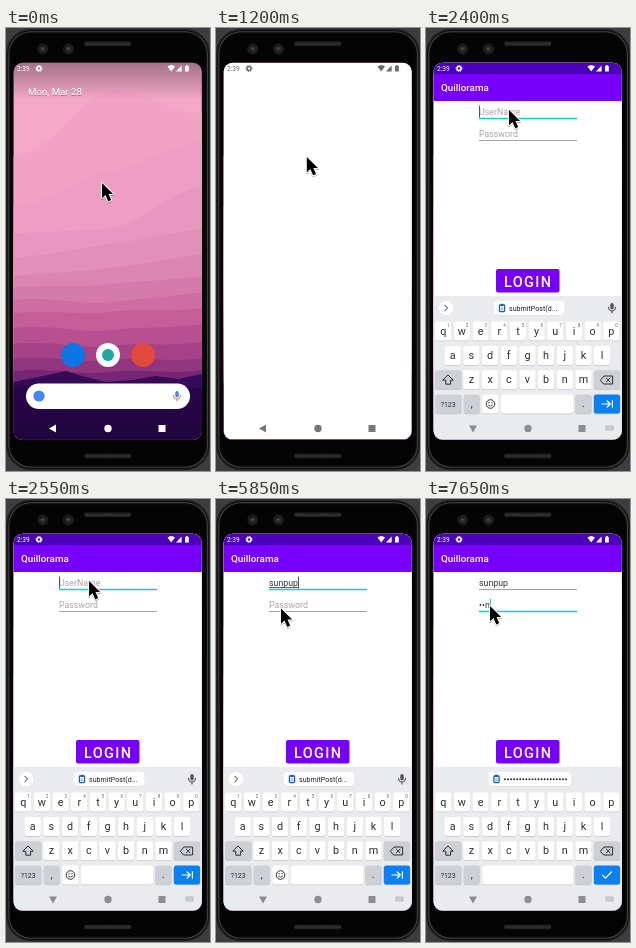
Recreate the animation shown at these times as an HTML page. Size 204 by 443 pixels, loop 8000 ms.

```html
<!DOCTYPE html>
<html lang="en">
<head>
<meta charset="utf-8">
<title>Login on a phone</title>
<style>
  html, body { margin: 0; width: 100%; height: 100%; overflow: hidden; background: #3d3d3f; }
  svg { display: block; font-family: Roboto, "Open Sans", sans-serif; }
  .mid { text-anchor: middle; }
  .medium { font-weight: 500; }
</style>
</head>
<body>
<svg id="stage" width="204" height="443" viewBox="0 0 204 443"></svg>
<script>
const LOOP = 8000, STEP = 150;
const USER = 'sunpup', APP = 'Quillorama';
const PURPLE = '#7800fa', TEAL = '#08d5c8';

const rect = (x, y, w, h, fill, rx = 0, more = '') =>
  `<rect x="${x}" y="${y}" width="${w}" height="${h}" rx="${rx}" fill="${fill}" ${more}/>`;
const circle = (x, y, r, fill, more = '') => `<circle cx="${x}" cy="${y}" r="${r}" fill="${fill}" ${more}/>`;
const path = (d, fill, more = '') => `<path d="${d}" fill="${fill}" ${more}/>`;
const line = (d, stroke, width = 1) =>
  path(d, 'none', `stroke="${stroke}" stroke-width="${width}" stroke-linecap="round" stroke-linejoin="round"`);
const text = (x, y, size, str, fill, more = '') =>
  `<text x="${x}" y="${y}" font-size="${size}" fill="${fill}" ${more}>${str}</text>`;
const group = (id, body, more = '') => `<g id="${id}" ${more}>${body}</g>`;

function phone() {
  const lens = x => circle(x, 21, 5, '#1b1b1d', 'stroke="#252527" stroke-width=".8"') +
    circle(x, 21, 2.6, '#303038') + circle(x - .5, 20.5, 1, '#4c4c58');
  const speaker = (y, h) => rect(78, y, 47.5, h, '#222224', 2) +
    path(`M80 ${y + h / 2}H124`, 'none', 'stroke="#363638" stroke-width="1.6" stroke-dasharray="2 1"');
  return rect(0, 0, 204, 443, '#3d3d3f') +
    rect(.8, 1.5, 202.4, 440, '#0a0a0a', 24, 'stroke="#232324" stroke-width="1.4"') +
    rect(2.8, 3.8, 198.6, 435.4, '#080808', 22, 'stroke="#434345" stroke-width="1.1"') +
    rect(5, 6, 194, 431, '#040404', 20) +
    lens(36.8) + lens(62.5) + speaker(13.5, 4.5) + speaker(425.7, 4.5);
}

function wallpaper() {
  // left, middle and right height of each haze layer
  const layers = [
    [128, 62, 84, '#f2a3c5'], [178, 142, 112, '#ee9ec2'], [206, 200, 158, '#e898c0'],
    [230, 216, 200, '#e28fba'], [248, 240, 226, '#dc85b3'], [260, 256, 248, '#d67aac'],
    [272, 274, 264, '#ce6ca3'], [285, 284, 280, '#c55d99'], [300, 302, 296, '#b84f90'],
    [316, 318, 314, '#a64187'], [331, 332, 330, '#91357f'], [343, 344, 342, '#772673']
  ];
  return rect(7, 34, 189, 378, '#f4a8c6') +
    layers.map(([l, m, r, c]) =>
      path(`M7 ${l}C50 ${l - 4} 75 ${m + 4} 105 ${m}S165 ${r + 5} 196 ${r}V412H7Z`, c)).join('') +
    path('M7 354L32 349L46 346L60 343L76 348L100 354L126 352L150 348L172 351L196 346V412H7Z', '#360b5a') +
    path('M7 357C55 353 70 368 110 366S165 357 196 360V412H7Z', '#2a064c') +
    rect(7, 34, 189, 378, 'url(#dusk)') + rect(7, 34, 189, 38, 'url(#shade)');
}

function mic(x, y, fill, base) {
  return rect(x - 1.7, y - 5, 3.4, 6.4, fill, 1.7) +
    line(`M${x - 3.4} ${y - .6}a3.4 3.6 0 0 0 6.8 0M${x} ${y + 3}v2`, base, 1.2);
}

function homeItems() {
  return text(22, 67, 9.7, 'Mon, Mar 28', '#fff', 'filter="url(#soft)"') +
    circle(67, 327, 12, '#0d75e4') +
    circle(102, 327, 12, '#fff') + circle(102, 327, 6, '#1ca9a0') +
    circle(137, 327, 12, '#df4a3c') +
    rect(20, 355.5, 164, 25.5, '#fff', 12.7) + circle(33, 368, 5.6, '#4285f4') +
    mic(171, 368, '#4285f4', '#ef7b45');
}

function statusBar() {
  return text(11, 43, 6.6, '2:39', 'currentColor') +
    circle(33, 40.5, 2, 'none', 'stroke="currentColor" stroke-width="1.5"') +
    circle(33, 40.5, 3, 'none', 'stroke="currentColor" stroke-width="1" stroke-dasharray="1.2 1.156"') +
    path('M161.5 38.6Q165.2 35.6 169 38.6L165.2 43.4Z', 'currentColor') +
    path('M170 43.4h5.6v-6Z', 'currentColor') +
    path('M179 38h1v-1h1.8v1h1v5.4H179Z', 'currentColor');
}

function navBar() {
  return group('back', path('M43 400.5L50 396.5V404.5Z', 'currentColor')) +
    circle(102, 400.5, 3.7, 'currentColor') + rect(152.5, 397, 7, 7, 'currentColor');
}

function button(x, y, w, h, label) {
  return rect(x, y, w, h, PURPLE, 2) +
    text(x + 8.1, y + 18, 14.5, label, '#fff', 'class="medium" letter-spacing="1.3"');
}

function field(id, hint, y) {
  return group(id, text(53, y, 8.8, hint, '#a6a6a6', 'class="hint"') +
    text(53, y, 8.8, '', '#333', 'class="value"') +
    path('', 'none', 'class="compose" stroke="#333" stroke-width=".8"') +
    path(`M53 ${y + 3.5}H151`, 'none', 'class="rule"') +
    rect(53, y - 9.5, 1, 12, id === 'user' ? '#555' : TEAL, 0, 'class="caret"'));
}

function app() {
  return rect(7, 34, 189, 378, '#fff') + rect(7, 46, 189, 27, PURPLE) + rect(7, 34, 189, 12, '#4b00b9') +
    text(15, 63.2, 9.8, APP, '#fff', 'class="medium"') +
    field('user', 'UserName', 87) + field('pass', 'Password', 109) +
    button(70, 241, 63.5, 23.5, 'LOGIN') + button(62, 316.5, 80, 23, 'SIGN UP') +
    group('darkNav', rect(7, 389, 189, 23, '#000'));
}

function keyboard() {
  const GREY = '#cdd1d6', INK = '#2c2e31';
  const key = (x, y, w, fill = '#fff') => rect(x, y + .8, w, 19, '#c3c6ca', 2.5) + rect(x, y, w, 19, fill, 2.5);
  const row = (letters, x0, y) => [...letters].map((c, i) => {
    const x = x0 + i * 18.68;
    return key(x - 8.2, y, 16.4) + text(x, y + 13, 10.8, c, INK, 'class="mid"');
  }).join('');
  const digits = [...'1234567890'].map((d, i) =>
    text(22.4 + i * 18.68, 298.6, 4.6, d, '#666', 'class="mid"')).join('');
  const clip = (x, y) => rect(x - 2.6, y - 3, 5.2, 6.6, 'none', .8, 'stroke="#1762b5" stroke-width="1.3"') +
    rect(x - 1.4, y - 4.2, 2.8, 2.2, '#1762b5') + line(`M${x - 1} ${y}h2M${x - 1} ${y + 1.8}h2`, '#1762b5', .6);
  const chip = (x, w, icon) => rect(x, 273.6, w, 14, '#d4d7db', 4) + rect(x, 273, w, 14, '#fff', 4) + clip(icon, 280);
  const face = circle(64.5, 376, 4.3, 'none', `stroke="${INK}" stroke-width="1"`) +
    circle(63, 374.8, .7, INK) + circle(66, 374.8, .7, INK) + line('M62.4 377.2q2.1 2 4.2 0', INK, .8);

  return rect(7, 268, 189, 144, '#e9ebef') +
    row('qwertyuiop', 17.2, 293.5) + row('asdfghjkl', 26.7, 318) + row('zxcvbnm', 45.4, 342.3) +
    key(9, 342.3, 26.5, GREY) + line('M22.2 347.2l5 5h-2.6v4h-4.8v-4h-2.6Z', INK) +
    key(167.8, 342.3, 26.3, GREY) + line('M174.6 352l3.4-4h8.6v8H178ZM180.4 350.2l3.6 3.6M184 350.2l-3.6 3.6', INK) +
    key(9, 366.5, 26.5, GREY) + text(22.2, 378.8, 7, '?123', INK, 'class="mid"') +
    key(37.7, 366.5, 16, GREY) + text(45.7, 379, 10, ',', INK, 'class="mid"') +
    key(149.2, 366.5, 16.4, GREY) + text(157.4, 379, 10, '.', INK, 'class="mid"') +
    key(167.8, 366.5, 26.3, '#0b80f0') +
    group('plainKeys', digits + key(56.2, 366.5, 16.4) + face + key(75, 366.5, 72) +
      circle(20, 280, 7, '#fff') + line('M18.8 277.2l2.8 2.8l-2.8 2.8', INK) +
      chip(68, 70.5, 76) + text(83, 282.6, 7.1, 'submitPost(d...', '#222') +
      mic(186, 280, '#555', '#555') +
      line('M176 376h8M181.2 373l3 3l-3 3M186.4 372.8v6.4', '#fff', 1.2)) +
    group('secretKeys', key(56.2, 366.5, 91) + line('M176.4 376.2l3 3l6-6.2', '#fff', 1.2)) +
    group('secretChip', chip(62.5, 82.5, 70.5) +
      Array.from({ length: 21 }, (_, i) => circle(79 + i * 3.05, 280.3, .95, '#222')).join('')) +
    rect(179.5, 397.5, 8, 5, '#b9bcc2', .8) + line('M181 399.2h5M181 401h5', '#e9ebef', .6);
}

const pointer = group('pointer', path('M0 0V15.2L3.5 12.1L6.3 18.4L9.2 17.1L6.5 11H11.1Z', '#000',
  'stroke="#fff" stroke-width="1.8" stroke-linejoin="round" paint-order="stroke" filter="url(#soft)"'));

document.getElementById('stage').innerHTML = `<defs>
  <clipPath id="screen">${rect(7.6, 34.8, 188.2, 376.8, '#000', 9)}</clipPath>
  <linearGradient id="dusk" x2="0" y2="1"><stop offset=".84" stop-color="#1d0338" stop-opacity="0"/>
    <stop offset="1" stop-color="#1d0338" stop-opacity=".75"/></linearGradient>
  <linearGradient id="shade" x2="0" y2="1"><stop offset="0" stop-color="#403038" stop-opacity=".46"/>
    <stop offset="1" stop-color="#403038" stop-opacity="0"/></linearGradient>
  <filter id="soft" x="-30%" y="-30%" width="160%" height="160%">
    <feDropShadow dx="0" dy=".7" stdDeviation=".7" flood-opacity=".5"/></filter>
</defs>` + phone() + group('view',
  wallpaper() + group('home', homeItems()) + group('splash', rect(7.6, 34.8, 188.2, 376.8, '#fff')) +
  group('app', app()) + group('keyboard', keyboard()) +
  group('status', statusBar()) + group('nav', navBar()), 'clip-path="url(#screen)"') + pointer;

const $ = id => document.getElementById(id);
const show = (el, on) => { el.style.display = on ? '' : 'none'; };
const within = (t, ...spans) => spans.some(([a, b]) => t >= a && t < b);
const countPast = (t, times) => times.filter(x => t >= x).length;

// Eased travel through [time, x, y] stops.
function along(stops, t) {
  const i = stops.findIndex(s => s[0] > t);
  if (i < 0) return stops[stops.length - 1].slice(1);
  if (i === 0) return stops[0].slice(1);
  const [t0, x0, y0] = stops[i - 1], [t1, x1, y1] = stops[i];
  const p = (t - t0) / (t1 - t0), e = p * p * (3 - 2 * p);
  return [x0 + (x1 - x0) * e, y0 + (y1 - y0) * e];
}

const ROUTE = [
  [0, 96, 155], [750, 96, 155], [1800, 82.8, 88.8], [2100, 83, 82],
  [5550, 83, 82], [5850, 65, 109.5], [6150, 64, 107]
];

function setField(id, y, value, focused, caretOn, composing) {
  const part = name => $(id).querySelector('.' + name);
  part('value').textContent = value;
  show(part('hint'), !value);
  const end = 53 + (value ? part('value').getComputedTextLength() : 0);
  part('caret').setAttribute('x', end);
  show(part('caret'), caretOn);
  part('compose').setAttribute('d', composing && value ? `M53 ${y + 1.5}H${end}` : '');
  part('rule').setAttribute('stroke', focused ? TEAL : '#999');
  part('rule').setAttribute('stroke-width', focused ? 1.7 : .9);
}

function draw(time) {
  const t = Math.floor(time / STEP) * STEP;
  const launching = within(t, [750, 1350]), inApp = t >= 1350;
  const typing = t >= 2100, secret = t >= 6300;

  show($('home'), t < 750);
  show($('splash'), launching);
  const scale = t < 900 ? .963 : 1;
  $('splash').setAttribute('transform', `translate(101.7 223.2) scale(${scale}) translate(-101.7 -223.2)`);
  show($('app'), inApp);
  show($('darkNav'), !typing);

  const rise = Math.min(1, (t - 1950) / 450);
  show($('keyboard'), typing);
  $('keyboard').setAttribute('transform', `translate(0 ${144 * (1 - rise) ** 2})`);
  show($('plainKeys'), !secret);
  show($('secretKeys'), secret);
  show($('secretChip'), t >= 6450);

  $('status').style.color = launching ? '#6f6870' : '#fff';
  $('nav').style.color = launching ? '#777' : typing ? '#8b8d91' : inApp ? '#a2a2a2' : '#fff';
  $('back').setAttribute('transform', typing ? 'rotate(-90 47 400.5)' : '');

  const name = USER.slice(0, countPast(t, [3450, 3750, 3900, 4950, 5100, 5400]));
  setField('user', 87, name, within(t, [2100, 6150]),
    within(t, [2250, 2850], [3300, 4500], [4800, 6150]), t < 6150);
  const n = countPast(t, [7200, 7350, 7650]);
  const masked = n ? '•'.repeat(n - 1) + USER[n - 1] : '';
  setField('pass', 109, masked, t >= 6150, within(t, [6150, 6750], [7200, LOOP]), false);

  $('pointer').setAttribute('transform', `translate(${along(ROUTE, t)})`);
}

const start = performance.now();
function tick() {
  draw((performance.now() - start) % LOOP);
  requestAnimationFrame(tick);
}
tick();
</script>
</body>
</html>
```
